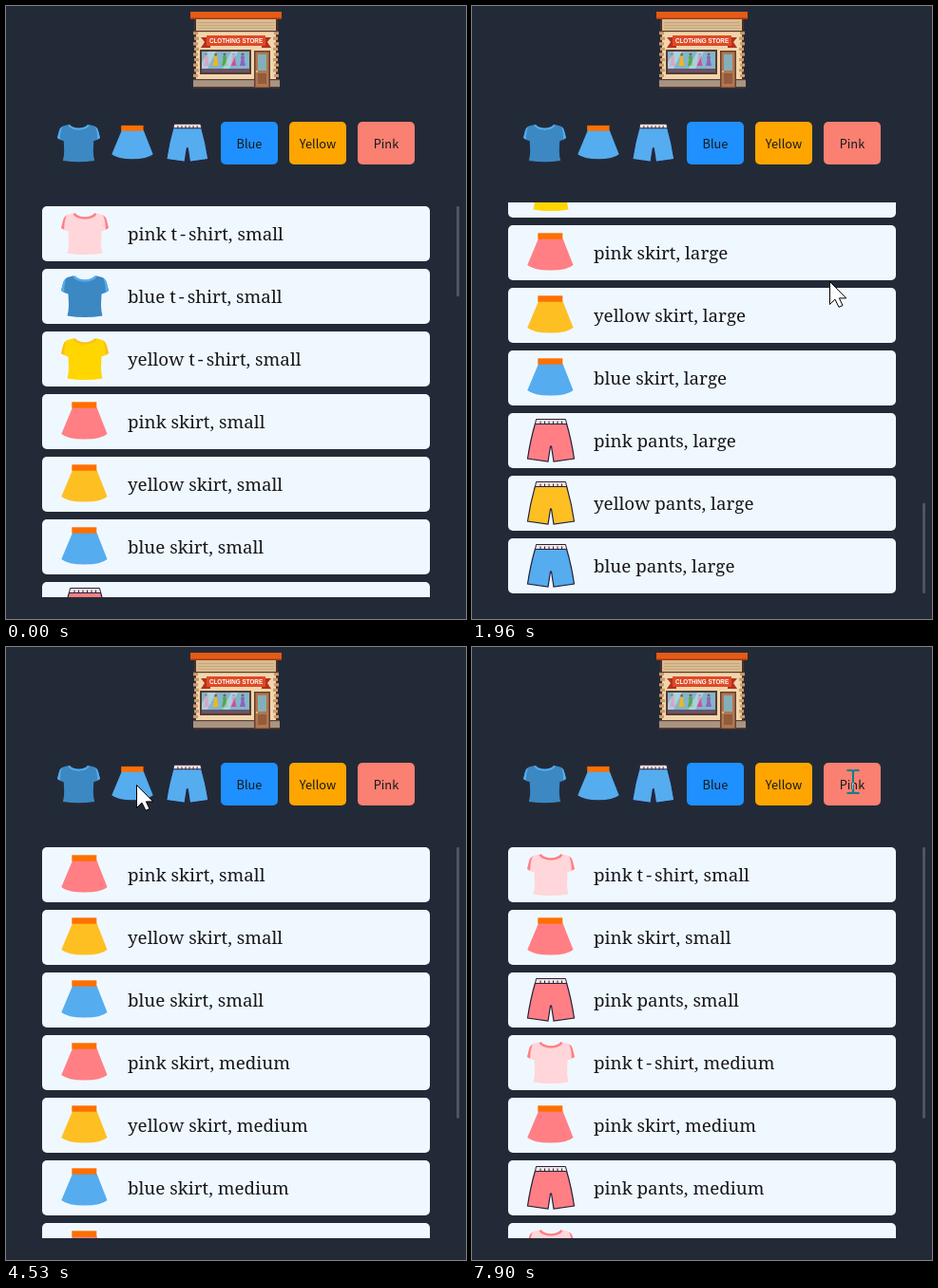
An HTML page for the animation above (8 s loop, 484 px wide and 646 px high).

```html
<!DOCTYPE html>
<html lang="en">
<head>
<meta charset="utf-8">
<title>Clothing store filter</title>
<style>
html, body { margin: 0; width: 100%; height: 100%; overflow: hidden; background: #232a37; }
svg { display: block; }
.row text { font: 18.8px "Noto Serif", serif; fill: #16181c; }
.row tspan { letter-spacing: 3px; }
.button { font: 12.8px "Noto Sans CJK JP", "Noto Sans CJK SC", "Open Sans", sans-serif; text-anchor: middle; fill: #16181c; }
.sign { font: bold 6.3px "Liberation Sans", sans-serif; text-anchor: middle; fill: #fff; }
#beam { mix-blend-mode: difference; }
</style>
</head>
<body>
<svg id="stage" width="484" height="646" viewBox="0 0 484 646">
  <defs>
    <clipPath id="view"><rect x="38" y="207" width="408" height="416"/></clipPath>
  </defs>
  <rect width="484" height="646" fill="#232a37"/>
  <g id="store"></g>
  <g id="filters"></g>
  <g clip-path="url(#view)"><g id="list"></g></g>
  <rect id="thumb" x="474" width="3" rx="1" fill="#50545d"/>
  <path id="arrow" d="M.5 .5V24.5L6 19.2L10 27.3L14 25.6L10.4 17.9H17.7Z" fill="#fff" stroke="#000"/>
  <path id="beam" d="M-6.5 -12H-2Q0 -12 0 -10Q0 -12 2 -12H6.5M0 -10V10M-6.5 12H-2Q0 12 0 10Q0 12 2 12H6.5" fill="none" stroke="#fff" stroke-width="2"/>
</svg>
<script>
const LOOP = 8000, STEP = 70, PITCH = 66, VIEW = 416;
const $ = id => document.getElementById(id);
const rect = (x, y, w, h, fill, rx = 0) => `<rect x="${x}" y="${y}" width="${w}" height="${h}" rx="${rx}" fill="${fill}"/>`;
const path = (d, fill, more = '') => `<path d="${d}" fill="${fill}" ${more}/>`;
const repeat = (n, draw) => Array.from({ length: n }, (_, i) => draw(i)).join('');

const CLOTH = { pink: '#ff7f84', yellow: '#fdbf22', blue: '#55acee' };
const SHIRT = { pink: '#ffd6da', yellow: '#ffd600', blue: '#3b88c3' };

// Each garment is drawn in a 50 x 50 box.
const garments = {
  't-shirt': c => {
    const trim = c === 'yellow' ? '#fcbe1d' : CLOTH[c];
    return path('M13 3.2C17 10.5 33 10.5 37 3.2L43.5 5Q46.5 6.5 48 11L50 19Q47 21.5 42.5 22.5L42 34Q42 40 43.5 45.5Q25 48.5 6.5 45.5Q8 40 8 34L7.5 22.5Q3 21.5 0 19L2 11Q3.5 6.5 6.5 5Z', SHIRT[c])
      + path('M6 5.3Q3 7 2 11L0 19L3.2 20.8Q3.2 11 6 5.3ZM44 5.3Q47 7 48 11L50 19L46.8 20.8Q46.8 11 44 5.3Z', trim)
      + path('M13.5 3.8C18 10 32 10 36.5 3.8', 'none', `stroke="${trim}" stroke-width="2.4"`);
  },
  skirt: c => path('M12 10H37.5L48.5 38Q42 43.5 24.5 43.5Q7 43.5 .3 38Z', CLOTH[c])
    + rect(11.3, 4.3, 26, 6.4, '#ff6f00'),
  pants: c => path('M8.5 7H41.5Q46.5 24 49.5 44L28 47L25.5 31H24.5L22 47L.5 44Q3.500 24 8.5 7Z', CLOTH[c], 'stroke="#24213f" stroke-width="1.2"')
    + path('M9.5 2.5H40.5L41.7 7.5H8.5Z', '#f8e5df', 'stroke="#24213f"')
    + path('M14 4.5V8M18.5 4.5V8M23 4.5V8M27.5 4.5V8M32 4.5V8M36.5 4.5V8', 'none', 'stroke="#24213f"'),
};

const items = ['small', 'medium', 'large'].flatMap(size => Object.keys(garments).flatMap(kind =>
  (kind === 't-shirt' ? ['pink', 'blue', 'yellow'] : ['pink', 'yellow', 'blue']).map(color => ({ size, kind, color }))));

const buttons = [['Blue', 226, '#1e90ff'], ['Yellow', 298, '#ffa500'], ['Pink', 370, '#fa8072']];
$('filters').innerHTML =
  Object.values(garments).map((draw, i) => `<g transform="translate(${[54, 111, 168.3][i]} 122) scale(.9)">${draw('blue')}</g>`).join('')
  + buttons.map(([name, x, fill]) => rect(x, 122, 60, 45, fill, 5)
    + `<text class="button" x="${x + 30}" y="150">${name}</text>`).join('');

function drawStore() {
  const siding = repeat(4, i => rect(202, 17 + i * 3, 80, .6, '#b99a70'));
  const bricks = repeat(9, i => rect(i % 2 ? 198 : 197, 27 + i * 5.6, 5, 3.2, '#c99b6c') + rect(i % 2 ? 281 : 282, 27 + i * 5.6, 5, 3.2, '#c99b6c'));
  const dresses = ['#e05a9c', '#f2b51f', '#54a845', '#cc4fa0', '#8e62bd'];
  const dolls = dresses.map((fill, i) => {
    const x = 211 + i * 9.5;
    return `<circle cx="${x}" cy="51" r="1.500" fill="#785f5c"/>` + path(`M${x - 2} 53H${x + 2}L${x + 1.5} 57L${x + 3} 63H${x - 3}L${x - 1.5} 57Z`, fill);
  }).join('');
  return rect(198, 13, 88, 66, '#4b3028') + rect(200, 14, 84, 64, '#f1d5ac') + rect(200, 14, 84, 13, '#d9bb91')
    + siding + bricks + rect(197, 26, 90, 1.2, '#57382c')
    + rect(194, 6, 96, 8, '#e45b16') + rect(194, 12.5, 96, 1.5, '#a63b14')
    + path('M205 33H215V44H205L209 38ZM279 33H269V44H279L275 38Z', '#b52f1b')
    + rect(211, 31, 62, 11, '#df4a27') + '<text class="sign" x="242" y="39">CLOTHING STORE</text>'
    + rect(204, 46, 54, 26, '#563a32') + rect(206, 48, 50, 22, '#82b6cb')
    + dolls + path('M212 48H221L210 70H206V60ZM237 48H244L233 70H226Z', '#d5edf2', 'opacity=".5"')
    + rect(206, 66, 50, 4, '#68546a')
    + rect(197, 77, 91, 9, '#a89483') + rect(197, 77, 91, 1.2, '#604238') + rect(197, 85, 91, 1.5, '#57392e')
    + rect(261, 47, 17, 39, '#65402e') + rect(262.5, 48.5, 14, 37, '#b17750')
    + rect(265, 51, 9, 17, '#84afba') + rect(265, 71, 9, 11, '#925c3d')
    + '<circle cx="264" cy="69" r="1" fill="#f0cd70"/>';
}
$('store').innerHTML = drawStore();

// The picture moves in bursts [start, end] and rests between them.
const bursts = [[0, 0], [210, 930], [1090, 1530], [1680, 1960], [2250, 2460], [2600, 3370], [3440, 3440],
  [3630, 4300], [4530, 5070], [5480, 5830], [6160, 6670], [7160, 7440]];
// [time, scroll offset]
const scrollKeys = [[640, 0], [930, 500], [1020, 500], [1300, 1061], [1530, 1200], [1610, 1200], [1960, 1366],
  [2180, 1366], [2460, 766], [2540, 766], [2740, 472], [2960, 0]];
// [time, x, y] of the pointer's hot spot
const pointerKeys = [[150, 405, -30], [570, 376, 287], [1370, 376, 287], [1680, 376, 290], [2250, 376, 290],
  [2600, 376, 289], [2900, 376, 289], [3370, 80, 146], [3440, 73, 146], [3640, 73, 146], [3980, 105, 141],
  [4300, 137, 145], [4560, 137, 145], [5070, 183, 147], [5410, 183, 147], [5830, 258, 150],
  [6190, 258, 150], [6670, 329, 143], [7090, 329, 143], [7440, 401, 142]];
const filterKeys = [[0, ''], [3630, 't-shirt'], [4530, 'skirt'], [5300, 'pants'], [6160, 'blue'], [6940, 'yellow'], [7900, 'pink']];

const latest = (keys, t) => keys.findLast(k => k[0] <= t);

function poseTime(t) {
  const [start, end] = latest(bursts, t);
  return Math.min(end, start + Math.floor((t - start) / STEP) * STEP);
}

function sample(keys, t, ease = p => p) {
  const next = keys.findIndex(k => k[0] > t);
  if (next < 0) return keys.at(-1).slice(1);
  if (next === 0) return keys[0].slice(1);
  const a = keys[next - 1], b = keys[next];
  const p = ease((t - a[0]) / (b[0] - a[0]));
  return a.slice(1).map((v, i) => v + (b[i + 1] - v) * p);
}
const smooth = p => p * p * (3 - 2 * p);

let shown, count;
function fillList(filter) {
  if (filter === shown) return;
  shown = filter;
  const rows = items.filter(it => !filter || it.kind === filter || it.color === filter);
  count = rows.length;
  $('list').innerHTML = rows.map(({ size, kind, color }, i) => {
    const label = `${color} ${kind}, ${size}`.replace('t-', '<tspan>t-</tspan>');
    return `<g class="row" transform="translate(38 ${211 + i * PITCH})">${rect(0, 0, 408, 58, '#f0f8ff', 5)}`
      + `<g transform="translate(20 4)">${garments[kind](color)}</g><text x="90" y="36">${label}</text></g>`;
  }).join('');
}

function render(now) {
  const t = now % LOOP, pose = poseTime(t);
  fillList(latest(filterKeys, t)[1]);

  const scroll = Math.round(sample(scrollKeys, pose)[0]);
  const content = count * PITCH, track = VIEW - 8;
  $('list').setAttribute('transform', `translate(0 ${-scroll})`);
  $('thumb').setAttribute('y', 211 + track * scroll / content);
  $('thumb').setAttribute('height', track * VIEW / content);

  const [x, y] = sample(pointerKeys, pose, smooth).map(Math.round);
  const overText = y > 132 && y < 158 && [[242, 269], [308, 347], [387, 413]].some(([l, r]) => x >= l && x <= r);
  for (const [id, on] of [['arrow', !overText], ['beam', overText]]) {
    $(id).setAttribute('transform', `translate(${x} ${y})`);
    $(id).setAttribute('visibility', on ? 'visible' : 'hidden');
  }
  requestAnimationFrame(render);
}
requestAnimationFrame(render);
</script>
</body>
</html>
```
